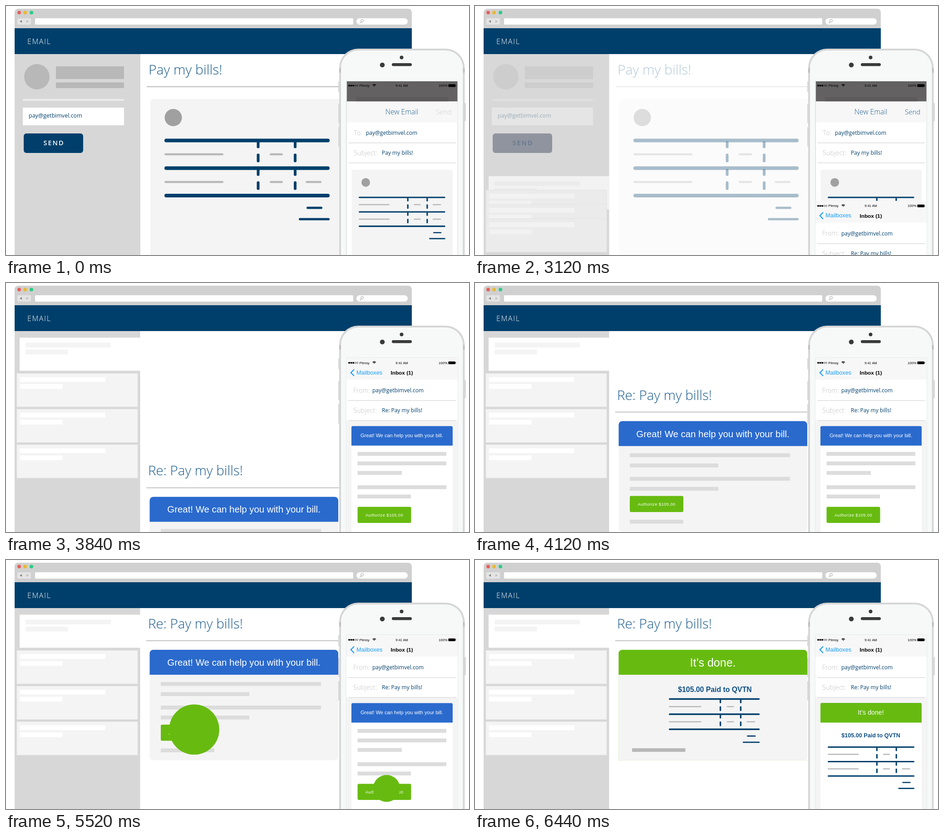
An HTML page with a canvas that plays this animation: 1020x549 px, repeating every 6520 ms.

```html
<!DOCTYPE html>
<html lang="en">
<head>
<meta charset="utf-8">
<title>Pay by email</title>
<style>
html, body { margin: 0; width: 100%; height: 100%; overflow: hidden; background: #fff; }
canvas { display: block; width: 1020px; height: 549px; }
</style>
</head>
<body>
<canvas id="stage"></canvas>
<script>
const W = 1020, H = 549, LOOP = 6520, STEP = 40;
const NAVY = '#003f6b', INK = '#1c5c8c', BLUE = '#2a6acd', GREEN = '#67bb10';
const PALE = '#f4f4f4', GREY = '#b8b8b8', BAR = '#dcdcdc', SIDE = '#d7d7d7';
const HUMAN = '"Open Sans", "Noto Sans", sans-serif';
const SWISS = '"Liberation Sans", Arial, sans-serif';
const ADDRESS = 'pay@getbimvel.com', PAYEE = 'QVTN', CARRIER = 'Plimsy';

const canvas = document.getElementById('stage');
const ctx = canvas.getContext('2d');
const dpr = window.devicePixelRatio || 1;
canvas.width = W * dpr;
canvas.height = H * dpr;

const clamp = v => Math.max(0, Math.min(1, v));
const mix = (a, b, p) => a + (b - a) * p;
// share of the way still to go for a slide that slows down
const left = (t, start, dur) => Math.pow(1 - clamp((t - start) / dur), 1.5);

// boxes are given by their edges
function box(x0, y0, x1, y1, color, r = 0) {
  ctx.fillStyle = color;
  ctx.beginPath();
  ctx.roundRect(x0, y0, x1 - x0, y1 - y0, r);
  ctx.fill();
}

function disc(x, y, r, color) {
  ctx.fillStyle = color;
  ctx.beginPath();
  ctx.arc(x, y, r, 0, Math.PI * 2);
  ctx.fill();
}

function path(points, color, width) {
  ctx.strokeStyle = color;
  ctx.lineWidth = width;
  ctx.beginPath();
  points.forEach(([x, y]) => ctx.lineTo(x, y));
  ctx.stroke();
}

function triangle(x, y, dx, color) {
  ctx.fillStyle = color;
  ctx.beginPath();
  ctx.moveTo(x + dx, y);
  ctx.lineTo(x - dx, y - 3);
  ctx.lineTo(x - dx, y + 3);
  ctx.fill();
}

function text(str, x, y, size, color, { weight = 400, font = HUMAN, align = 'left', gap = 0 } = {}) {
  ctx.font = `${weight} ${size}px ${font}`;
  ctx.letterSpacing = gap + 'px';
  ctx.textAlign = align;
  ctx.fillStyle = color;
  ctx.fillText(str, x, y);
}

function group(draw, { x = 0, y = 0, scale = 1, alpha = 1, clip } = {}) {
  ctx.save();
  if (clip) {
    ctx.beginPath();
    ctx.roundRect(...clip);
    ctx.clip();
  }
  ctx.translate(x, y);
  ctx.scale(scale, scale);
  ctx.globalAlpha *= alpha;
  draw();
  ctx.restore();
}

const LIGHT = { weight: 300 };
const MID = { font: SWISS, align: 'center' };
const BOLD_MID = { font: SWISS, align: 'center', weight: 700 };

// invoice table, 364 units wide, origin at the middle of the top rule's left end
function bill(x, y, scale, rule, extra) {
  const hbar = (x0, x1, cy, w, c) => box(x0, cy - w / 2, x1, cy + w / 2, c, w / 2);
  group(() => {
    for (const row of [0, 1]) {
      const cy = 30.5 + row * 61;
      hbar(0, 130, cy, 4.5, GREY);
      hbar(232, 261, cy, 4.5, GREY);
      if (row || extra) hbar(311, 346, cy, 4.5, GREY);
      for (const dx of [206.5, 288]) {
        box(dx - 3, row * 61 + 2, dx + 3, row * 61 + 17, NAVY, 2.5);
        box(dx - 3, row * 61 + 29, dx + 3, row * 61 + 48, NAVY, 2.5);
      }
    }
    for (const cy of [0, 61, 121.5]) hbar(0, 364, cy, rule, NAVY);
    hbar(313, 348, 148.5, 5, NAVY);
    hbar(296, 364, 173.5, 5, NAVY);
  }, { x, y, scale });
}

function authorize(x, y) {
  box(x, y, x + 118, y + 35.5, GREEN, 3);
  text('Authorize $105.00', x + 59, y + 21.5, 9.2, '#fff', { font: SWISS, align: 'center', gap: 0.5 });
}

function drawChrome() {
  box(19, 6, 894, 60, '#d0d0d0', [8, 8, 0, 0]);
  disc(29, 14.5, 4, '#e8605c');
  disc(42, 14.5, 4, '#e9b931');
  disc(56, 14.5, 4, '#2fcb87');
  box(25, 27, 55, 41, '#e4e4e4', 2);
  triangle(32.5, 34, -2.5, '#858585');
  triangle(47.5, 34, 2.5, '#bcbcbc');
  box(64, 27, 765, 41, '#fff', 2);
  box(772, 27, 885, 41, '#fff', 7);
  ctx.strokeStyle = GREY;
  ctx.lineWidth = 1.2;
  ctx.beginPath();
  ctx.arc(784.5, 32.5, 2.8, 0, Math.PI * 2);
  ctx.stroke();
  path([[782.5, 34.8], [779.5, 38]], GREY, 1.6);
  box(19, 49, 894, 106, NAVY);
  text('EMAIL', 47, 83.5, 16, '#fff', { weight: 300, gap: 1.6 });
}

function drawCompose(pressed) {
  box(19, 106, 296, H, SIDE);
  disc(68, 156, 28, GREY);
  box(110, 133, 260, 161, GREY);
  box(110, 168.5, 260, 181, GREY);
  box(37, 205, 260, 209, '#ececec');
  box(37, 224, 260, 263, '#fff');
  text(ADDRESS, 50, 246, 12.5, NAVY);
  box(39, 281, 170, 324, pressed ? '#000d2a' : NAVY, 6);
  text('SEND', 82.5, 307, 14.5, pressed ? NAVY : '#fff', { weight: 600, gap: 2 });

  box(296, 106, 894, H, '#fff');
  text('Pay my bills!', 314, 151, 30, INK, LIGHT);
  box(310, 177, 760, 179, '#bdbdbd');
  box(318, 205, 780, 570, PALE, 8);
  disc(368.5, 246, 19, '#a0a0a0');
  bill(349, 296.5, 1, 8, false);
}

function drawList(t) {
  [120.5, 199.5, 278, 356.5].forEach((end, i) => {
    const y = mix(end, H, left(t, 2960, 546 - 5 * i));
    const first = i === 0, x = first ? 43 : 31, dy = first ? 11 : 8;
    if (first) box(30, y, 296, y + 73, '#fff');
    else {
      box(23.5, y - 0.5, 290.5, y + 74, '#e8e8e8');
      box(24.5, y + 0.5, 289.5, y + 73, PALE);
    }
    const tone = first ? PALE : '#fff';
    box(x, y + dy, x + 188, y + dy + 10.5, tone);
    box(x, y + dy + 15.5, x + 93.5, y + dy + 26, tone);
  });
}

function drawReply() {
  text('Re: Pay my bills!', 313, 151, 29.6, INK, LIGHT);
  box(309, 177, 760, 179, '#c4c4c4');
  box(316.5, 198, 732, 441.5, PALE, 8);
  box(316.5, 198, 732, 253, BLUE, [8, 8, 0, 0]);
  text('Great! We can help you with your bill.', 524, 233, 20.4, '#fff', MID);
  [[269, 694], [291.5, 536], [321, 694], [343, 536], [415.5, 459]].forEach(([y, x1]) =>
    box(341, y, x1, y + 8.5, BAR));
  authorize(341, 363);
}

function drawDone() {
  box(316.5, 198, 732, 441.5, '#fff');
  box(316.5, 198, 732, 441.5, PALE, 8);
  box(316.5, 198, 732, 253, GREEN, [8, 8, 0, 0]);
  text('It’s done.', 524, 235, 25, '#fff', MID);
  text('$105.00 Paid to ' + PAYEE, 528.5, 291, 15.8, '#0d4f85', BOLD_MID);
  bill(427, 306.5, 0.55, 6.5, false);
  box(346, 415, 463.5, 423, GREY);
}

function drawPhoneBody() {
  for (const [y0, y1] of [[166, 190], [216, 258], [267, 310]]) box(732, y0, 736, y1, '#d9d9d9', 1);
  box(1008, 214, 1013, 254, '#d9d9d9', 1);
  box(734, 94, 1010.5, 640, '#d6d6d6', 42);
  box(734, 137, 738, 147, '#bfbfbf');
  box(1006.5, 137, 1010.5, 147, '#bfbfbf');
  box(738, 98, 1006.5, 640, '#f7f9f9', 38);
  disc(871.5, 113.5, 4, '#3a3a3a');
  disc(829, 130, 5.3, '#3a3a3a');
  box(850, 126, 894, 132.5, '#3a3a3a', 3.2);
  box(749.5, 164.5, 995.5, H, '#dadede');
}

function drawStatus(y) {
  for (let i = 0; i < 5; i++) {
    const x = 756 + i * 4.5;
    if (i < 3) disc(x, y, 2, '#000');
    else {
      ctx.strokeStyle = '#000';
      ctx.lineWidth = 0.6;
      ctx.beginPath();
      ctx.arc(x, y, 1.7, 0, Math.PI * 2);
      ctx.stroke();
    }
  }
  text(CARRIER, 778.5, y + 2.7, 7.6, '#000', { font: SWISS });
  ctx.strokeStyle = '#000';
  ctx.lineWidth = 1.2;
  for (const r of [1, 3, 5]) {
    ctx.beginPath();
    ctx.arc(811.3, y + 2.2, r, -Math.PI * 0.76, -Math.PI * 0.24);
    ctx.stroke();
  }
  text('9:41 AM', 872, y + 2.7, 7.4, '#000', MID);
  text('100%', 953, y + 2.7, 7.6, '#000', { font: SWISS });
  box(974.5, y - 3, 990, y + 3, '#000', 1);
  box(990.5, y - 1, 991.5, y + 1, '#000');
}

function drawPhoneCompose(sent) {
  box(751, 165, 994.5, H, '#fff');
  box(751, 166, 994.5, 210.5, '#636161');
  box(771, 201, 975, 210.5, '#5c5a5a', [4, 4, 0, 0]);
  drawStatus(175.5);
  box(751, 210.5, 994.5, 256.5, '#f7f7f7');
  text('New Email', 872, 239, 15.6, INK, { weight: 300, align: 'center' });
  text('Send', 947, 238.5, 15, sent ? INK : '#cfcfcf', LIGHT);
  text('To:', 766, 285, 14.6, '#c0c0c0', LIGHT);
  text(ADDRESS, 793, 284, 12, NAVY);
  box(755, 301, 991, 302.5, BAR);
  text('Subject:', 766, 328.5, 14.6, '#c0c0c0', LIGHT);
  text('Pay my bills!', 828, 328, 12, NAVY);
  box(755, 345, 991, 346.5, BAR);
  box(761.5, 361, 984, 570, PALE, 4);
  disc(792.5, 389, 9.5, '#a0a0a0');
  bill(777, 422, 0.524, 6, true);
}

function drawPhoneReply() {
  box(750, 165, 995, H, '#fff');
  box(750, 165, 995, 213, '#f7f7f7');
  drawStatus(176);
  path([[767, 190.5], [759.8, 197.7], [767, 205]], '#1a9ef5', 2.2);
  text('Mailboxes', 772, 201.5, 12.7, '#1a9ef5', { font: SWISS });
  text('Inbox (1)', 872, 202, 11.8, '#000', BOLD_MID);
  text('From:', 765, 241.5, 14, '#c0c0c0', LIGHT);
  text(ADDRESS, 807, 241, 12, NAVY);
  box(754, 258.5, 992, 260, BAR);
  text('Subject:', 765, 286, 14.6, '#c0c0c0', LIGHT);
  text('Re: Pay my bills!', 828, 285, 12, NAVY);
  box(754, 302.5, 992, 304, BAR);
  box(750, 304, 995, H, PALE);
  box(761, 316, 984, H, '#fff');
  box(761, 315.5, 984, 358.5, BLUE, [3, 3, 0, 0]);
  text('Great! We can help you with your bill.', 872, 339.5, 11, '#fff', MID);
  [[372.5, 970], [393.5, 970], [414.5, 872], [446, 970], [466.5, 892]].forEach(([y, x1]) =>
    box(774.5, y, x1, y + 8.5, BAR));
  authorize(774.5, 493.5);
}

function drawPhoneDone() {
  box(761, 316, 984, H, '#fff');
  box(761, 315.5, 984, 358.5, GREEN, [2, 2, 0, 0]);
  text('It’s done!', 872, 341, 14.2, '#fff', MID);
  text('$105.00 Paid to ' + PAYEE, 872, 390.5, 12.6, '#0d4f85', BOLD_MID);
  bill(777, 412.5, 0.525, 6, false);
}

function draw(t) {
  const pressed = t >= 2000;
  const replyLeft = left(t, 3640, 800);
  const phoneLeft = left(t, 2960, 728);
  const grow = clamp((t - 5440) / 680);
  const done = clamp((t - 6120) / 320);

  box(0, 0, W, H, '#fff');
  box(19, 105, 295.5, H, SIDE);
  group(() => {
    if (t >= 3000) drawList(t);
    if (t >= 3680) group(drawReply, { y: 421 * replyLeft });
    const old = t < 3000 ? 1 : 1 - clamp((t - 2960) / 240);
    if (old > 0) group(() => drawCompose(pressed), { alpha: old });
  }, { clip: [19, 105, 875, 444] });
  if (grow > 0)
    group(() => disc(mix(400, 524, grow), mix(381, 320, grow), 470 * grow, GREEN),
      { clip: [316.5, 198, 415.5, 243.5] });
  if (done > 0) group(drawDone, { alpha: done });
  drawChrome();

  drawPhoneBody();
  group(() => {
    if (phoneLeft > 0) drawPhoneCompose(pressed);
    if (t >= 3000) group(drawPhoneReply, { y: 384 * phoneLeft });
  }, { clip: [750, 165, 245, 384] });
  if (grow > 0)
    group(() => disc(mix(833, 879, grow), mix(511, 448, grow), 252 * grow, GREEN),
      { clip: [761, 315.5, 223, 240, 3] });
  if (done > 0) group(drawPhoneDone, { alpha: done });
}

function tick(now) {
  const t = Math.floor((now % LOOP) / STEP) * STEP;
  ctx.setTransform(dpr, 0, 0, dpr, 0, 0);
  draw(t);
  requestAnimationFrame(tick);
}
requestAnimationFrame(tick);
</script>
</body>
</html>
```
